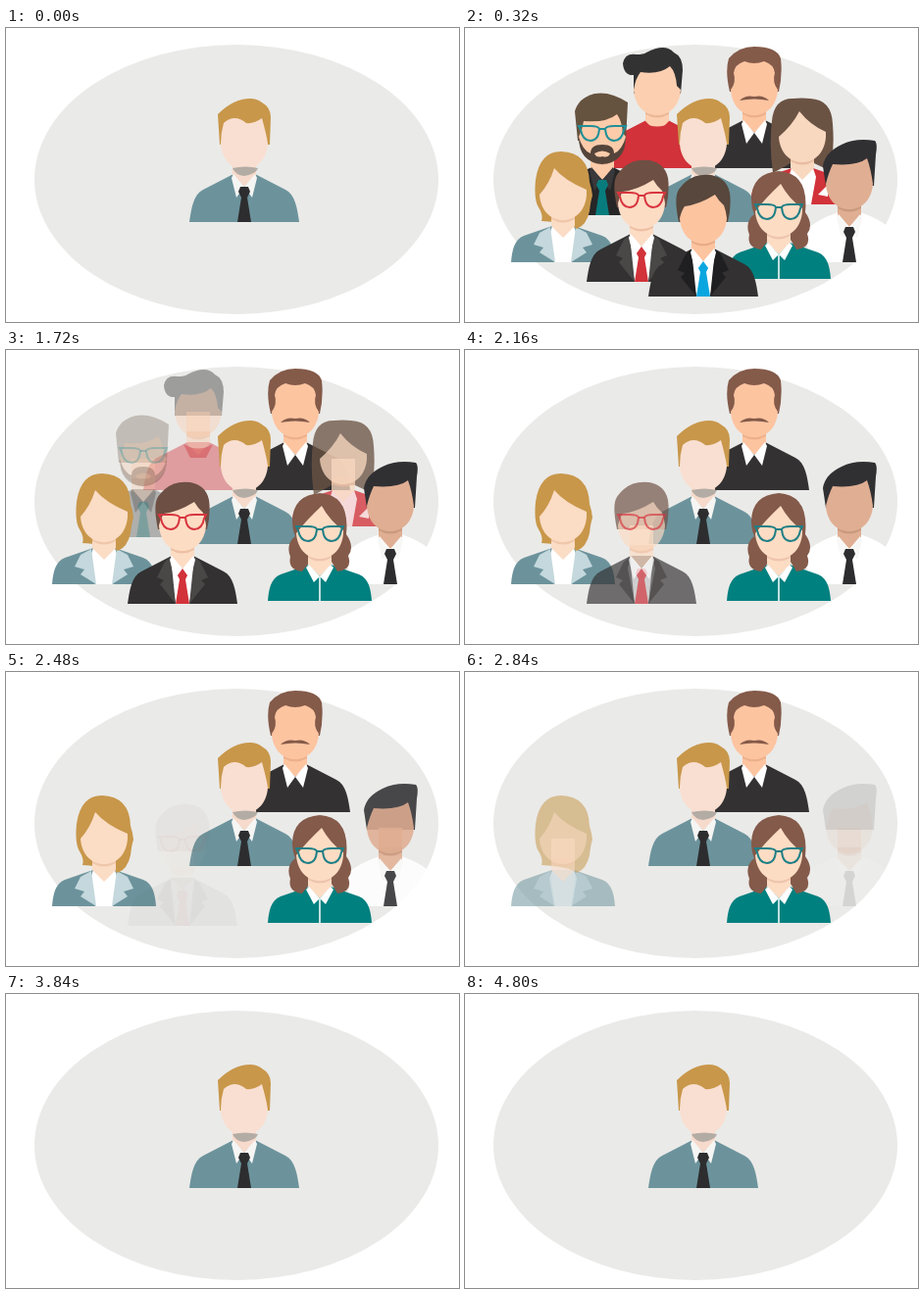
An HTML page that plays this animation: 462x300 px, repeating every 5600 ms.

```html
<!DOCTYPE html>
<html lang="en">
<head>
<meta charset="utf-8">
<title>Team</title>
<style>
html, body { margin: 0; width: 100%; height: 100%; overflow: hidden; background: #fff; }
svg { display: block; width: 100%; height: 100%; }
</style>
</head>
<body>
<svg id="stage" viewBox="0 0 462 300">
  <ellipse cx="235" cy="154.5" rx="206" ry="137.5" fill="#eaeae8"/>
</svg>
<script>
const LOOP = 5600, FADE_IN = [20, 310];
const stage = document.getElementById('stage');

const shape = (d, fill, extra = '') => `<path d="${d}" fill="${fill}" ${extra}/>`;
const lower = (markup, dy = 11) => `<g transform="translate(0 ${dy})">${markup}</g>`;
const mirror = markup => markup + `<g transform="scale(-1 1)">${markup}</g>`;

// Every figure is drawn around the bottom centre of its bust.
const torso = fill => shape('M-56 0C-54 -14 -52 -28 -42 -33L-11 -49H11L42 -33C52 -28 54 -14 56 0Z', fill);
const slimTorso = fill => shape('M-53 0C-52 -12 -50 -23 -40 -27L-11 -37H11L40 -27C50 -23 52 -12 53 0Z', fill);
const neck = (fill, shade) =>
  shape('M-12 -80H12V-48L0 -36L-12 -48Z', fill) +
  shape('M-12 -60V-55Q0 -48 12 -55V-60Z', shade);
// The hairline is the upper edge of the face, from the left to the right temple.
const face = (fill, hairline) =>
  shape(`M-24 -80${hairline}L24 -80C23 -64 13 -54 0 -54C-13 -54 -23 -64 -24 -80Z`, fill);
const head = (hair, hairFill, skin, shade, hairline) =>
  shape(hair, hairFill) + neck(skin, shade) + face(skin, hairline);
const womanHead = (hair, hairFill, skin, shade, hairline) =>
  shape(hair, hairFill) + lower(neck(skin, shade) + face(skin, hairline));

const collar = fill => mirror(shape('M-11 -49L0 -36L-8 -25L-13 -45Z', fill));
const slimCollar = mirror(shape('M-11 -37L0 -25L-6 -19L-14 -34Z', '#fff'));
const tie = fill => shape('M-4 -36H4L6 -31L3 -25L7 0H-7L-3 -25L-6 -31Z', fill);
const shirt = shape('M-11 -49L0 -36L11 -49L14 -36L7 0H-7L-14 -36Z', '#fff');
const blouse = shape('M-11 -37H11L14 -28L9 0H-9L-14 -28Z', '#fff');
const lapels = fill => mirror(shape('M-12 -48L-18 -43L-26 -27L-19 -24L-23 -20L-7 0Z', fill));
const suit = (cloth, edge, tieColor) => torso(cloth) + shirt + lapels(edge) + tie(tieColor);
const glasses = (color, y) => {
  const line = `stroke="${color}" stroke-width="2"`;
  return lower(mirror(shape('M-3 3Q-4 0 -12 0H-24L-22 4Q-20 15 -12 15Q-4 15 -3 3Z', 'none', line)) +
    shape('M-3 3H3', 'none', line), y);
};

const shortHair = 'M-25 -76Q-29 -95 -27 -104Q-26 -110 -18 -117Q-8 -126 8 -124Q24 -121 27 -106Q29 -92 25 -76Z';
const sweptLine = 'Q-22 -88 -19 -92Q-4 -94 12 -104Q16 -97 21 -93Q23 -88 24 -80';

const moustacheMan = torso('#333132') +
  head('M-25 -78Q-30 -99 -26 -112Q-16 -124 0 -124Q23 -124 27 -112Q29 -95 25 -78Z', '#845a49', '#fdc4a0', '#edb08c',
    'Q-18 -88 -21 -97Q-20 -106 -10 -109Q0 -105 10 -109Q20 -106 21 -97Q18 -88 24 -80') +
  collar('#fff') + shape('M-15 -69Q-9 -75 0 -73Q9 -75 15 -69Q0 -72 -15 -69Z', '#845a49');

const redMan = torso('#d2323a') +
  head('M-24 -76V-95Q-34 -94 -35 -107Q-33 -118 -21 -116Q-14 -116 -11 -118Q8 -128 17 -118Q26 -114 26 -100L24 -76Z',
    '#333233', '#fccfb0', '#ecb896', 'Q-22 -92 -17 -98Q2 -95 13 -104Q19 -98 20 -84') +
  shape('M-15 -47Q0 -38 15 -47L8 -33H-8Z', '#d2323a');

const beardMan = torso('#262627') +
  head('M-25 -76L-28 -106Q-24 -120 -8 -124Q8 -127 26 -115L24 -76Z', '#65523f', '#fccbaa', '#e3ae8c',
    'Q-20 -88 -19 -96Q4 -94 15 -103Q20 -96 21 -84') +
  collar('#39383a') + tie('#087c7d') +
  shape('M-24 -80Q-24 -54 0 -52Q24 -54 24 -80Q20 -66 12 -63Q12 -72 0 -72Q-12 -72 -12 -63Q-20 -66 -24 -80Z', '#54443a') +
  shape('M-8 -63Q0 -68 8 -63Q6 -58 0 -60Q-6 -58 -8 -63Z', '#fccbaa') +
  glasses('#1f8f97', -91);

const redWoman = slimTorso('#d2323a') + blouse + mirror(shape('M16 -10L27 -21L26 -8Z', '#fff')) +
  womanHead('M-30 -32Q-34 -60 -31 -85Q-29 -108 -10 -108Q0 -109 8 -108Q30 -107 31 -82Q33 -58 29 -34L12 -42H-12Z',
    '#6b5344', '#f9d8c0', '#e8bda2', 'Q-10 -92 -3 -106Q8 -92 24 -85');

const hero = torso('#6c939c') + shape('M-12 -65H12V-48L0 -36L-12 -48Z', '#f6dacb') +
  shape('M-25 -79L-27 -110Q-11 -126 6 -126Q13 -126 18 -122Q27 -117 27 -107L26 -79Z', '#c8974a') +
  face('#f9dfd1', 'Q-24 -91 -21 -101Q-10 -111 2 -101Q10 -100 18 -106Q23 -88 24 -80') +
  collar('#f5f5f4') + tie('#2d2d2f') +
  shape('M-12 -55Q1 -58 14 -55Q12 -49 0 -47Q-9 -48 -12 -55Z', '#b3aca5');

const whiteMan = shape('M-43 0V-34Q-32 -44 -11 -51H11Q34 -43 41 -34L48 0Z', '#fff') +
  head('M-24 -78L-27 -98Q-25 -112 -8 -120Q6 -127 26 -124Q29 -121 27 -110L25 -78Z', '#303033', '#e0ae92', '#c99a7f',
    'Q-21 -92 -17 -100Q8 -98 18 -106Q22 -95 24 -80') +
  collar('#f7f7f6') + tie('#2d2d2f');

const blondeWoman = slimTorso('#6c939c') + blouse +
  mirror(shape('M-13 -36L-24 -30L-30 -18L-20 -15L-24 -10L-8 0Z', '#c4d8dd')) +
  womanHead('M-22 -42Q-20 -48 -25 -56Q-30 -64 -28 -84Q-24 -113 -2 -113Q26 -112 27 -82Q29 -76 30 -68Q28 -62 27 -52Q24 -38 14 -34Q8 -40 -22 -42Z',
    '#c8974a', '#fbdcc5', '#efc7ab', 'Q-14 -91 -9 -107Q2 -94 24 -85');

const redGlassesMan = suit('#333132', '#4a4747', '#d2323a') +
  head(shortHair, '#6e4f44', '#fddcc4', '#eec0a4', sweptLine) + collar('#fff') + glasses('#d8363f', -91);

const tealWoman = slimTorso('#00807f') +
  womanHead('M0 -110Q-27 -108 -28 -82Q-28 -73 -25 -66Q-35 -58 -30 -45Q-33 -32 -18 -30L-10 -40H12L18 -30Q34 -32 29 -46Q36 -55 27 -68Q31 -108 0 -110Z',
    '#845a4a', '#fddcc4', '#efc5ad', 'Q-14 -93 2 -108Q10 -93 24 -83') +
  slimCollar + shape('M0 -25V0', 'none', 'stroke="#fff" stroke-width="1.5"') + glasses('#1f7f85', -76);

const frontMan = suit('#333132', '#1f1e20', '#0aa6df') +
  head(shortHair, '#57473c', '#fdc4a0', '#e8ad87', sweptLine) + collar('#fff');

// [drawing, x, baseline, fade-out start, fade-out end], back to front
const people = [
  [moustacheMan, 295, 143, 3350, 3840],
  [redMan, 196, 143, 1400, 1950],
  [beardMan, 140, 191, 1300, 1900],
  [redWoman, 344, 180, 1600, 2120],
  [hero, 243, 198],
  [whiteMan, 392, 239, 2420, 2900],
  [blondeWoman, 100, 239, 2610, 3110],
  [redGlassesMan, 180, 259, 2000, 2500],
  [tealWoman, 320, 256, 2975, 3480],
  [frontMan, 243, 274, 1000, 1600],
];

for (const [drawing, x, y, outStart, outEnd] of people) {
  const group = document.createElementNS('http://www.w3.org/2000/svg', 'g');
  group.setAttribute('transform', `translate(${x} ${y})`);
  group.innerHTML = drawing;
  stage.append(group);
  if (!outStart) continue;
  const steps = [[0, 0], [FADE_IN[0], 0], [FADE_IN[1], 1], [outStart, 1], [outEnd, 0], [LOOP, 0]];
  const frames = steps.map(([time, opacity]) => ({ offset: time / LOOP, opacity }));
  // Each part fades by itself, so the layers beneath show through.
  for (const part of group.querySelectorAll('path')) {
    part.animate(frames, { duration: LOOP, iterations: Infinity });
  }
}
</script>
</body>
</html>
```
